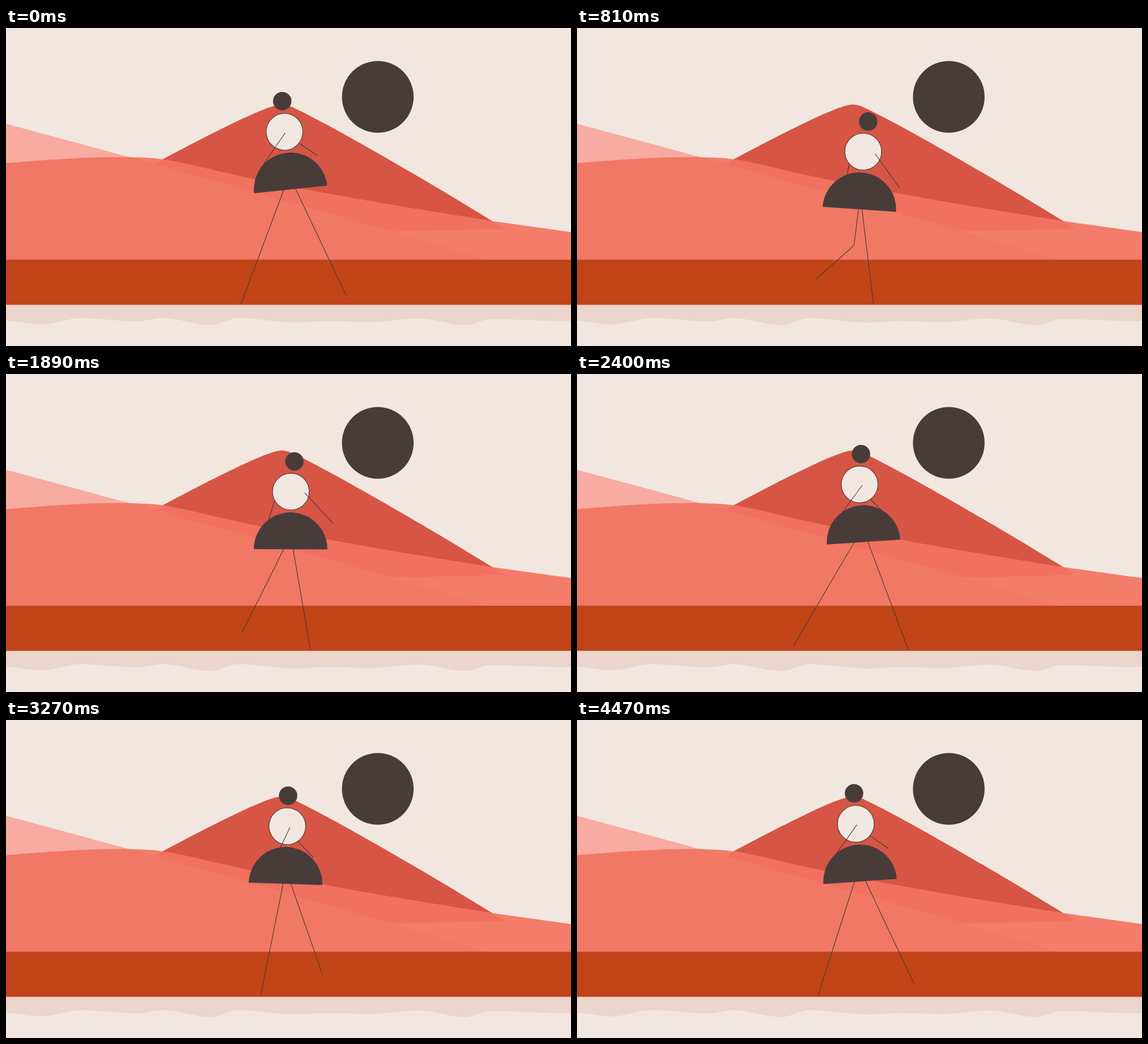
Recreate the animation shown at these times as an HTML page. Size 998 by 561 pixels, loop 4500 ms.

```html
<!DOCTYPE html>
<html lang="en">
<head>
<meta charset="utf-8">
<title>Desert walk</title>
<style>
  html, body { margin: 0; width: 100%; height: 100%; overflow: hidden; background: #f1e7e0; }
  svg { display: block; width: 998px; height: 561px; }
  .line { fill: none; stroke: #453938; stroke-width: 1.1; }
  .dark { fill: #483c3b; }
</style>
</head>
<body>
<svg viewBox="0 0 998 561">
  <defs>
    <path id="mountain" d="M255 244L276 232C340 198 440 146 475 137Q489 132.5 502 138C545 156 700 243 858 340L881 354.5L683 359L262 243Z"/>
    <path id="slope" d="M0 169Q425 282 850 409H0Z"/>
    <path id="hill" d="M0 238.5C90 231 180 225 250 229C300 232 330 244 440 267C580 296 720 319 858 340.5L998 360V412H0Z"/>
    <clipPath id="onHill"><use href="#hill"/></clipPath>
  </defs>
  <rect width="998" height="561" fill="#f1e7e0"/>
  <circle class="dark" cx="656.7" cy="121.5" r="63.3"/>
  <use href="#mountain" fill="#d75545"/>
  <use href="#slope" fill="#f8aba0"/>
  <use href="#hill" fill="#f47c6a"/>
  <g clip-path="url(#onHill)">
    <use href="#mountain" fill="#f17160"/>
    <use href="#slope" fill="#f07864"/>
  </g>
  <path id="shore" fill="#ebd5cd"/>
  <rect y="408.8" width="998" height="79.6" fill="#c14418"/>

  <path id="legA" class="line"/>
  <path id="legB" class="line"/>
  <path id="farArm" class="line"/>
  <circle id="torso" r="32.4" fill="#f2e7e0" stroke="#453938" stroke-width="1.1"/>
  <path id="nearArm" class="line"/>
  <path id="skirt" class="dark" d="M-65 0A65 65 0 0 1 65 0Z"/>
  <circle id="head" class="dark" r="16.3"/>
</svg>
<script>
const STRIDE = 1125, STEP = STRIDE / 2, TICK = 30, LOOP = 4500;
const BONE = 89.3, LEG_SHIFT = 33, GROUND = 486.5;
const $ = id => document.getElementById(id);
const rad = deg => deg * Math.PI / 180;
const mod = (a, b) => ((a % b) + b) % b;
const wave = (t, period, peak) => Math.cos(2 * Math.PI * (t - peak) / period);
const smooth = u => u * u * (3 - 2 * u);

// Periodic monotone cubic through key poses [position, ...values].
function through(period, keys) {
  const n = keys.length;
  const at = (i, c) => keys[mod(i, n)][c] + (c ? 0 : period * Math.floor(i / n));
  const slope = (i, c) => (at(i + 1, c) - at(i, c)) / (at(i + 1, 0) - at(i, 0));
  const tangent = (i, c) => {
    const a = slope(i - 1, c), b = slope(i, c);
    return a * b <= 0 ? 0 : 2 * a * b / (a + b);
  };
  return (x, c) => {
    x = mod(x, period);
    let i = n - 1;
    while (i >= 0 && at(i, 0) > x) i--;
    const h = at(i + 1, 0) - at(i, 0), u = (x - at(i, 0)) / h, v = 1 - u;
    return at(i, c) + (at(i + 1, c) - at(i, c)) * smooth(u)
      + h * u * v * (tangent(i, c) * v - tangent(i + 1, c) * u);
  };
}

// One step cycle of a foot: push off, lift, swing, land, slide back.
const footPose = through(STRIDE, [
  [125, 381.5, GROUND], [198, 384, 457], [247, 389.5, 443], [315, 421.5, 429],
  [532, 562, 465], [607, 571.5, 481], [650, 566, GROUND], [1095, 425.5, GROUND]
]);
const foot = (t, shift) => [footPose(t, 1) + shift, footPose(t, 2)];

// Degrees from straight down, positive forward: near arm, far arm.
const armPose = through(STRIDE, [
  [0, -34.5, 56], [195, -36.7, 38.5], [315, -10, -22],
  [630, 57.5, -31], [810, 35.6, -10.5], [1095, -35.5, 55]
]);

const place = (id, x, y, turn = 0) =>
  $(id).setAttribute('transform', `translate(${x} ${y}) rotate(${turn})`);
const trace = (id, ...points) => $(id).setAttribute('d', 'M' + points.join('L'));

// Two equal bones, knee forward; stretches straight when out of reach.
function drawLeg(id, hip, end) {
  const dx = end[0] - hip[0], dy = end[1] - hip[1], d = Math.hypot(dx, dy);
  const bend = Math.sqrt(Math.max(0, BONE * BONE - d * d / 4)) / d;
  const knee = [hip[0] + dx / 2 + dy * bend, hip[1] + dy / 2 - dx * bend];
  trace(id, hip, knee, end);
}

function drawArm(id, x, y, angle) {
  const len = 75 - Math.max(0, angle - 36) * 0.19;
  const a = rad(angle);
  trace(id, [x, y], [x + len * Math.sin(a), y + len * Math.cos(a)]);
}

function draw(t) {
  const drop = 1 - Math.abs(2 * mod(t / STEP, 1) - 1);
  const y = 183.1 + 38.5 * smooth(drop ** 1.6);
  const lean = wave(t, STEP, 8);
  const torsoX = 499.1 - 7.2 * lean;
  const skirtX = 499.2 + 8.2 * wave(t, STEP, 101), skirtY = y + 101.7;
  const tilt = -7.4 * wave(t, STEP, 58), sin = Math.sin(rad(tilt));

  place('torso', torsoX, y);
  place('head', 502 - 14.2 * wave(t, STEP, 12), y - 53.6 - 0.45 * lean);
  place('skirt', skirtX, skirtY, tilt);

  const hip = [skirtX + 25 * sin, skirtY - 25 * Math.cos(rad(tilt))];
  drawLeg('legA', hip, foot(t, 0));
  drawLeg('legB', hip, foot(t + STEP, LEG_SHIFT));

  const reach = 16 - 15 * wave(t, STRIDE, 25);
  drawArm('nearArm', torsoX + reach, y + 2 + reach * sin, armPose(t, 1));
  drawArm('farArm', torsoX - reach, y + 2 - reach * sin, armPose(t, 2));
}

// Crests and hollows of the shoreline.
const shoreY = through(998, [
  [0, 516.5], [60, 523], [132, 512], [232, 517.5], [277, 512], [361, 524], [410, 512],
  [515, 519.5], [565, 517], [645, 518.5], [728, 512.5], [811, 524], [857, 513.5], [985, 517]
]);
const shore = [[0, 488]];
for (let x = 0; x < 998; x += 3) shore.push([x, shoreY(x, 1)]);
trace('shore', ...shore, [998, shoreY(0, 1)], [998, 488]);

const start = performance.now();
function frame() {
  const t = Math.max(0, performance.now() - start) % LOOP;
  draw(Math.floor(t / TICK) * TICK);
  requestAnimationFrame(frame);
}
frame();
</script>
</body>
</html>
```
